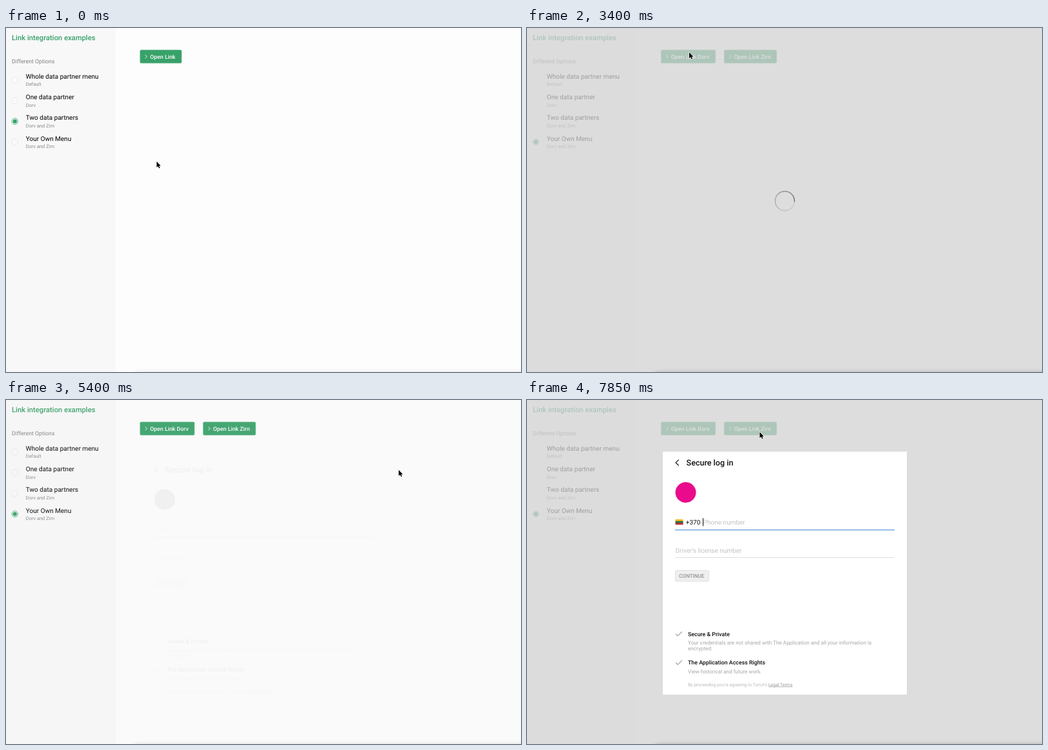
An HTML page for the animation above (8 s loop, 800 px wide and 536 px high).

```html
<!DOCTYPE html>
<html lang="en">
<head>
<meta charset="utf-8">
<title>Link integration examples</title>
<style>
  html, body { margin: 0; width: 100%; height: 100%; overflow: hidden; background: #fdfdfd; }
  svg { display: block; width: 800px; height: 536px; }
  text { font-family: Roboto, Arial, sans-serif; text-rendering: geometricPrecision; white-space: pre; }
  .medium { font-weight: 500; }
  .heading { font-size: 11.25px; fill: #38a169; }
  .label { font-size: 8.8px; fill: #808080; }
  .option { font-size: 10.07px; fill: #000; }
  .note { font-size: 7.45px; fill: #8a8a8a; }
  .button { font-size: 8.8px; fill: #fff; }
  .title { font-size: 12.55px; fill: #111; }
  .field { font-size: 10px; fill: #c2c2c2; }
  .continue { font-size: 8.15px; fill: #929292; }
  .point { font-size: 8.8px; fill: #111; }
  .detail { font-size: 8.18px; fill: #a6a6a6; }
  .legal { font-size: 6.88px; fill: #b8b8b8; }
  .legal tspan { fill: #999; text-decoration: underline; }
  .line { fill: none; stroke-linecap: round; stroke-linejoin: round; }
</style>
</head>
<body>
<svg viewBox="0 0 800 536">
  <defs>
    <filter id="blur" x="-10%" y="-100%" width="120%" height="300%"><feGaussianBlur stdDeviation="4.5"/></filter>
  </defs>

  <rect width="800" height="536" fill="#fdfdfd"/>
  <rect width="169" height="536" fill="#f8f8f8"/>
  <rect x="168.5" width="1" height="536" fill="#f3f3f3"/>
  <text class="heading medium" x="9" y="19">Link integration examples</text>
  <text class="label" x="9" y="55.1">Different Options</text>
  <g id="options"></g>
  <g id="single"></g>
  <g id="pair"></g>

  <rect id="veil" width="800" height="536" fill="#d4d3d4"/>
  <g id="spinner"></g>

  <g id="modal">
    <rect x="211" y="80.5" width="379" height="378.5" fill="#fff"/>
    <path class="line" d="M235.3 93.4L231 97.6L235.3 101.8" stroke="#111" stroke-width="1.2"/>
    <text class="title medium" x="247.6" y="102">Secure log in</text>
    <circle id="logo" cx="246.5" cy="144" r="16"/>
    <g id="loginFields">
      <text class="field" x="230.5" y="194">Email</text>
      <text class="field" x="230.5" y="237.7">Password</text>
    </g>
    <g id="phoneFields">
      <rect x="230.5" y="186" width="12" height="3" fill="#f5b71c"/>
      <rect x="230.5" y="188.8" width="12" height="3" fill="#1b6b47"/>
      <rect x="230.5" y="191.5" width="12" height="2.8" fill="#bd2b31"/>
      <text class="field" x="246.8" y="194" style="fill:#111">+370</text>
      <text class="field" x="273.8" y="194">Phone number</text>
      <text class="field" x="230.5" y="237.7">Driver's license number</text>
    </g>
    <rect id="caret" y="184" width="1" height="12.5" fill="#111"/>
    <rect x="230" y="202" width="341" height="1" fill="#dedede"/>
    <rect x="230" y="245" width="341" height="1" fill="#dedede"/>
    <rect id="underline" x="230" y="202" height="1" fill="#3f86d8"/>
    <rect x="230.5" y="265.5" width="52" height="17" rx="1.5" fill="#efefef" stroke="#e2e2e2"/>
    <text class="continue medium" x="236" y="277.2">CONTINUE</text>
    <path class="line" d="M231.3 364.8L234.2 367.6L240.5 361.2M231.3 409.6L234.2 412.4L240.5 406" stroke="#555" stroke-width=".9"/>
    <text class="point medium" x="250" y="367.6">Secure &amp; Private</text>
    <text class="detail" x="250" y="380.9">Your credentials are not shared with The Application and all your information is</text>
    <text class="detail" x="250" y="390.2">encrypted.</text>
    <text class="point medium" x="250" y="412.3">The Application Access Rights</text>
    <text class="detail" x="250" y="425.6">View historical and future work.</text>
    <text class="legal" x="250" y="445.6">By proceeding you're agreeing to Tunvil's <tspan>Legal Terms</tspan></text>
  </g>

  <rect id="shadow" x="200" y="539" width="660" height="30" filter="url(#blur)"/>
  <g id="cursor">
    <path id="arrow" d="M0 0V9.2L2.1 7.3L3.6 10.6L5.2 9.9L3.7 6.7H6.4Z" fill="#000" stroke="#fff" stroke-width="1.2" paint-order="stroke"/>
    <path id="hand" class="line" d="M-1 6.8V.9Q-1 0 0 0T1 .9V4.3L4.6 5.1Q6 5.5 6 7L5 12H-.2L-3.4 8Q-3.9 6.6-2.7 6.4Z" fill="#fff" stroke="#111" stroke-width=".9" style="fill:#fff"/>
  </g>
</svg>

<script>
const LOOP = 8000;
const PARTNERS = ["Dorv", "Zirn"];
const BOTH = PARTNERS.join(" and ");
const OPTIONS = [
  ["Whole data partner menu", "Default"],
  ["One data partner", PARTNERS[0]],
  ["Two data partners", BOTH],
  ["Your Own Menu", BOTH],
];
const ROW = 32.2;
const SELECT_AT = 1450, SWAP = 200;

const SESSIONS = [
  { click: 3350, open: 3650, focus: 3750, logo: 3750, close: 5150, gone: 5450, color: "#000", caretX: 230.5 },
  { click: 6550, open: 7250, focus: 7360, logo: 7400, close: LOOP, gone: LOOP, color: "#ea0b8c", caretX: 273 },
];

// Pointer stops: time, x, y
const STOPS = [
  [50, 234, 208], [850, 63, 146], [900, 63, 146], [1250, 64, 176],
  [2000, 64, 176], [2800, 250, 39], [2850, 250, 39], [3100, 252, 38],
  [4200, 252, 38], [4750, 610, 109],
  [5450, 610, 109], [5950, 364, 52], [6000, 364, 52], [6300, 361.5, 50],
];

const $ = id => document.getElementById(id);
const clamp = v => Math.max(0, Math.min(1, v));
const progress = (t, from, length) => clamp((t - from) / length);
const smooth = p => p * p * (3 - 2 * p);
const show = (id, on) => { $(id).style.display = on ? "" : "none"; };
const set = (el, attrs) => { for (const k in attrs) el.setAttribute(k, attrs[k]); };

function button(x, width, label) {
  return `<rect x="${x + .25}" y="34.25" width="${width - .5}" height="20.5" rx="2" fill="#38a169" stroke="#5fb688" stroke-width=".6"/>
    <path class="line" d="M${x + 8.6} 42L${x + 10.9} 44.5L${x + 8.6} 47" stroke="#fff" stroke-width=".9"/>
    <text class="button medium" x="${x + 15.8}" y="47.6">${label}</text>`;
}

function build() {
  $("options").innerHTML = OPTIONS.map(([name, note], i) => {
    const y = i * ROW;
    return `<circle class="ring" cx="13.8" cy="${81 + y}" r="4.8" fill="#fafafa" stroke-width=".8"/>
      <circle class="dot" cx="13.8" cy="${81 + y}" fill="#38a169"/>
      <text class="option" x="30.8" y="${79 + y}">${name}</text>
      <text class="note" x="30.8" y="${90.4 + y}">${note}</text>`;
  }).join("");
  $("single").innerHTML = button(208, 65, "Open Link");
  $("pair").innerHTML = button(208, 85, "Open Link " + PARTNERS[0]) + button(306, 82, "Open Link " + PARTNERS[1]);

  const count = 48, r = 15;
  const point = a => `${(r * Math.cos(a)).toFixed(2)} ${(r * Math.sin(a)).toFixed(2)}`;
  let arcs = "";
  for (let i = 0; i < count; i++) {
    const a = i / count * 2 * Math.PI + .08, b = a + 2 * Math.PI / count;
    const opacity = .1 + .55 * (i / count) ** 1.6;
    arcs += `<path d="M${point(a)}A${r} ${r} 0 0 1 ${point(b)}" stroke-opacity="${opacity.toFixed(3)}"/>`;
  }
  $("spinner").innerHTML = `<g fill="none" stroke="#222" stroke-width="1.4">${arcs}</g>`;
}

function pointerAt(t) {
  const next = STOPS.findIndex(s => s[0] > t);
  if (next === 0) return STOPS[0].slice(1);
  if (next < 0) return STOPS[STOPS.length - 1].slice(1);
  const [t0, x0, y0] = STOPS[next - 1], [t1, x1, y1] = STOPS[next];
  const p = smooth((t - t0) / (t1 - t0));
  return [x0 + (x1 - x0) * p, y0 + (y1 - y0) * p];
}

function drawOptions(t, hovered) {
  const p = progress(t, SELECT_AT - 50, SWAP);
  const amount = [0, 0, 1 - p, p];
  document.querySelectorAll(".ring").forEach((ring, i) =>
    ring.setAttribute("stroke", amount[i] > .1 || hovered === i ? "#38a169" : "#e4e4e4"));
  document.querySelectorAll(".dot").forEach((dot, i) => dot.setAttribute("r", 3.2 * amount[i]));
}

function drawSession(t) {
  const index = SESSIONS.findIndex(s => t >= s.click + 50 && t < s.gone);
  const s = SESSIONS[index];
  for (const id of ["veil", "modal", "spinner"]) show(id, s);
  $("shadow").setAttribute("opacity", .25);
  if (!s) return;

  const leaving = s.close < LOOP ? progress(t, s.close - 1, s.gone - s.close) : 0;
  const fade = (1 - leaving) ** 1.2;
  const entering = progress(t, s.open, 100);
  $("veil").setAttribute("opacity", .75 * fade);
  $("shadow").setAttribute("opacity", .25 + .2 * fade);

  show("spinner", t < s.open);
  set($("spinner"), { transform: `translate(400.5 269.5) rotate(${(t - s.click - 50) * .36})` });

  show("modal", t >= s.open);
  set($("modal"), {
    opacity: entering * fade ** 1.5,
    transform: `translate(0 ${13 * leaving})`,
  });
  show("logo", t >= s.logo);
  $("logo").setAttribute("fill", s.color);
  show("loginFields", index === 0);
  show("phoneFields", index === 1);

  const focused = t - s.focus;
  show("caret", focused >= 0 && focused % 1000 < 500);
  $("caret").setAttribute("x", s.caretX);
  $("underline").setAttribute("width", 341 * (1 - (1 - progress(t, s.focus, 400)) ** 2.2));
}

function draw(t) {
  const [x, y] = pointerAt(t);
  const blocked = SESSIONS.some(s => t >= s.click && t < s.gone);
  const row = Math.floor((y - 67) / ROW);
  const onOption = !blocked && x < 146 && row >= 0 && row < OPTIONS.length;
  const onButton = !blocked && y > 34 && y < 55 && (x > 208 && x < 293 || x > 306 && x < 388);
  const pointing = onOption || onButton;

  drawOptions(t, onOption ? row : -1);
  show("single", t < SELECT_AT);
  show("pair", t >= SELECT_AT);
  drawSession(t);
  show("arrow", !pointing);
  show("hand", pointing);
  $("cursor").setAttribute("transform", `translate(${x.toFixed(2)} ${y.toFixed(2)})`);
}

build();
const start = performance.now();
function tick() {
  draw((performance.now() - start) % LOOP);
  requestAnimationFrame(tick);
}
tick();
</script>
</body>
</html>
```
